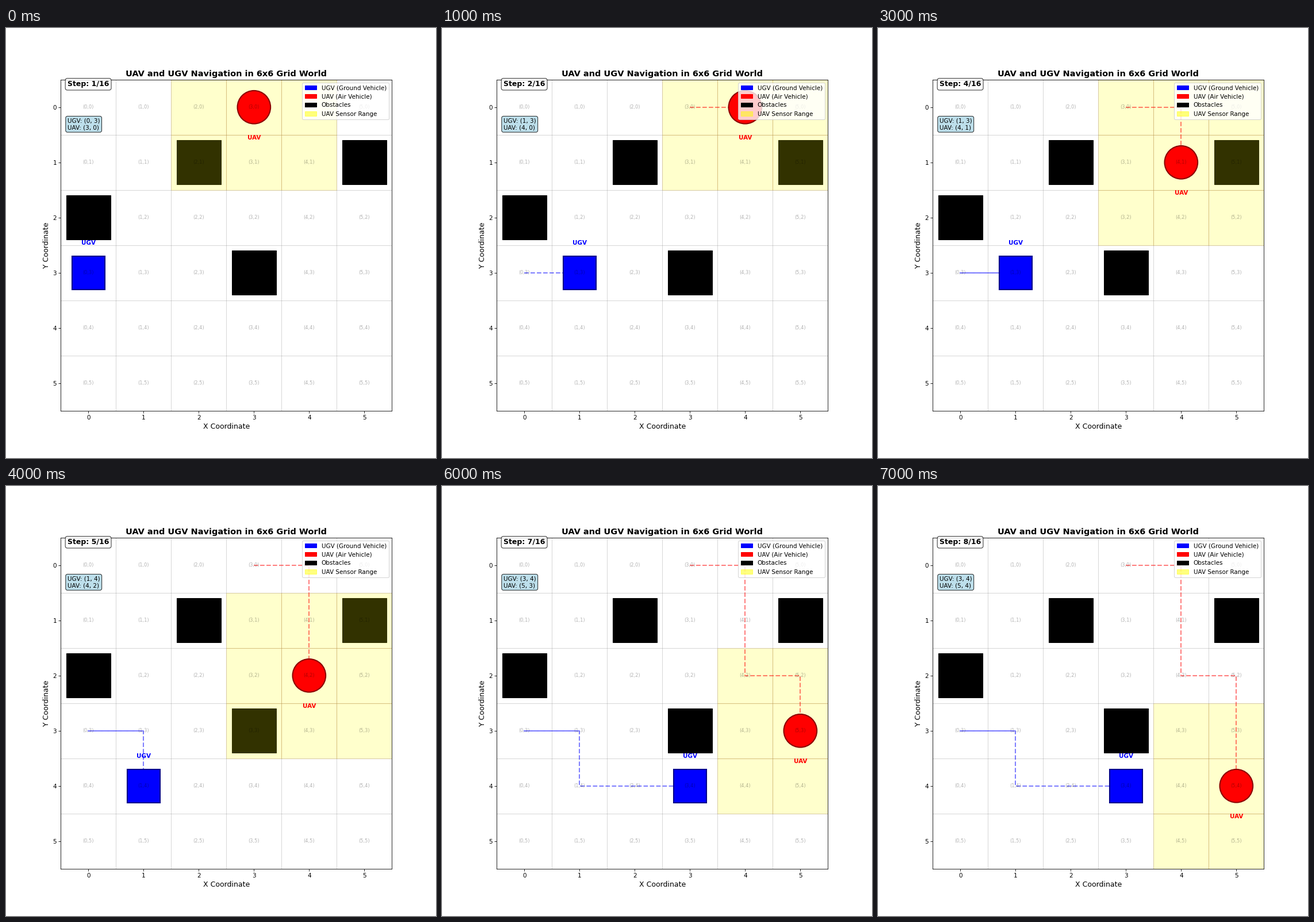
Recreate the animation shown at these times as a matplotlib script. Size 748 by 748 pixels, loop 8 s.

```python
import matplotlib.pyplot as plt
from matplotlib.animation import FuncAnimation
from matplotlib.patches import Circle, Patch, Rectangle

SIZE = 6
STEPS = 16
OBSTACLES = [(2, 1), (5, 1), (0, 2), (3, 3)]
UGV_PATH = [(0, 3), (1, 3), (0, 3), (1, 3), (1, 4), (2, 4), (3, 4), (3, 4)]
UAV_PATH = [(3, 0), (4, 0), (4, 1), (4, 1), (4, 2), (5, 2), (5, 3), (5, 4)]
CELLS = [(x, y) for y in range(SIZE) for x in range(SIZE)]

fig, ax = plt.subplots(figsize=(10, 10), dpi=74.8)
ax.set_xlim(-0.5, SIZE - 0.5)
ax.set_ylim(SIZE - 0.5, -0.5)
ax.set_aspect("equal")
ax.set_xticks(range(SIZE))
ax.set_yticks(range(SIZE))
ax.set_xlabel("X Coordinate", fontsize=12)
ax.set_ylabel("Y Coordinate", fontsize=12)
ax.set_title("UAV and UGV Navigation in 6x6 Grid World",
             fontsize=14, fontweight="bold")


def square(x, y, side, **style):
    return ax.add_patch(Rectangle((x - side / 2, y - side / 2), side, side, **style))


def trail(color):
    return ax.plot([], [], color=color, linestyle="--", linewidth=2, alpha=0.5)[0]


def tag(name, color):
    return ax.text(0, 0, name, color=color, fontsize=10, fontweight="bold",
                   ha="center", va="center")


def note(y, face, **style):
    return ax.text(0.02, y, "", transform=ax.transAxes,
                   bbox=dict(boxstyle="round", facecolor=face, alpha=0.8), **style)


for i in range(SIZE + 1):
    ax.axhline(i - 0.5, color="gray", linewidth=1, alpha=0.3)
    ax.axvline(i - 0.5, color="gray", linewidth=1, alpha=0.3)

for x, y in OBSTACLES:
    square(x, y, 0.8, facecolor="black", edgecolor="black")

sensor = {(x, y): square(x, y, 1, facecolor="yellow", edgecolor="orange",
                         linewidth=1, alpha=0.2)
          for x, y in CELLS}

for x, y in CELLS:
    ax.text(x, y, f"({x},{y})", fontsize=8, alpha=0.3, ha="center", va="center")

ugv_trail = trail("blue")
uav_trail = trail("red")
ugv = square(0, 0, 0.6, facecolor="blue", edgecolor="darkblue",
             linewidth=2, zorder=2.4)
uav = ax.add_patch(Circle((0, 0), 0.3, facecolor="red", edgecolor="darkred",
                          linewidth=2, zorder=2.4))
ugv_tag = tag("UGV", "blue")
uav_tag = tag("UAV", "red")
step_note = note(0.98, "white", fontsize=12, fontweight="bold")
place_note = note(0.85, "lightblue", fontsize=10)

ax.legend(loc="upper right", handles=[
    Patch(color="blue", label="UGV (Ground Vehicle)"),
    Patch(color="red", label="UAV (Air Vehicle)"),
    Patch(color="black", label="Obstacles"),
    Patch(color="yellow", alpha=0.5, label="UAV Sensor Range"),
])


def update(step):
    gx, gy = UGV_PATH[step]
    px, py = UAV_PATH[step]

    # The sensor covers the 3x3 block around the air vehicle
    for (x, y), cell in sensor.items():
        cell.set_visible(abs(x - px) <= 1 and abs(y - py) <= 1)

    ugv_trail.set_data(*zip(*UGV_PATH[:step + 1]))
    uav_trail.set_data(*zip(*UAV_PATH[:step + 1]))
    ugv.set_xy((gx - 0.3, gy - 0.3))
    uav.set_center((px, py))
    ugv_tag.set_position((gx, gy - 0.54))
    uav_tag.set_position((px, py + 0.55))
    step_note.set_text(f"Step: {step + 1}/{STEPS}")
    place_note.set_text(f"UGV: ({gx}, {gy})\nUAV: ({px}, {py})")
    return []


anim = FuncAnimation(fig, update, frames=len(UGV_PATH), interval=1000,
                     init_func=lambda: update(0), repeat=True)
plt.show()
```
